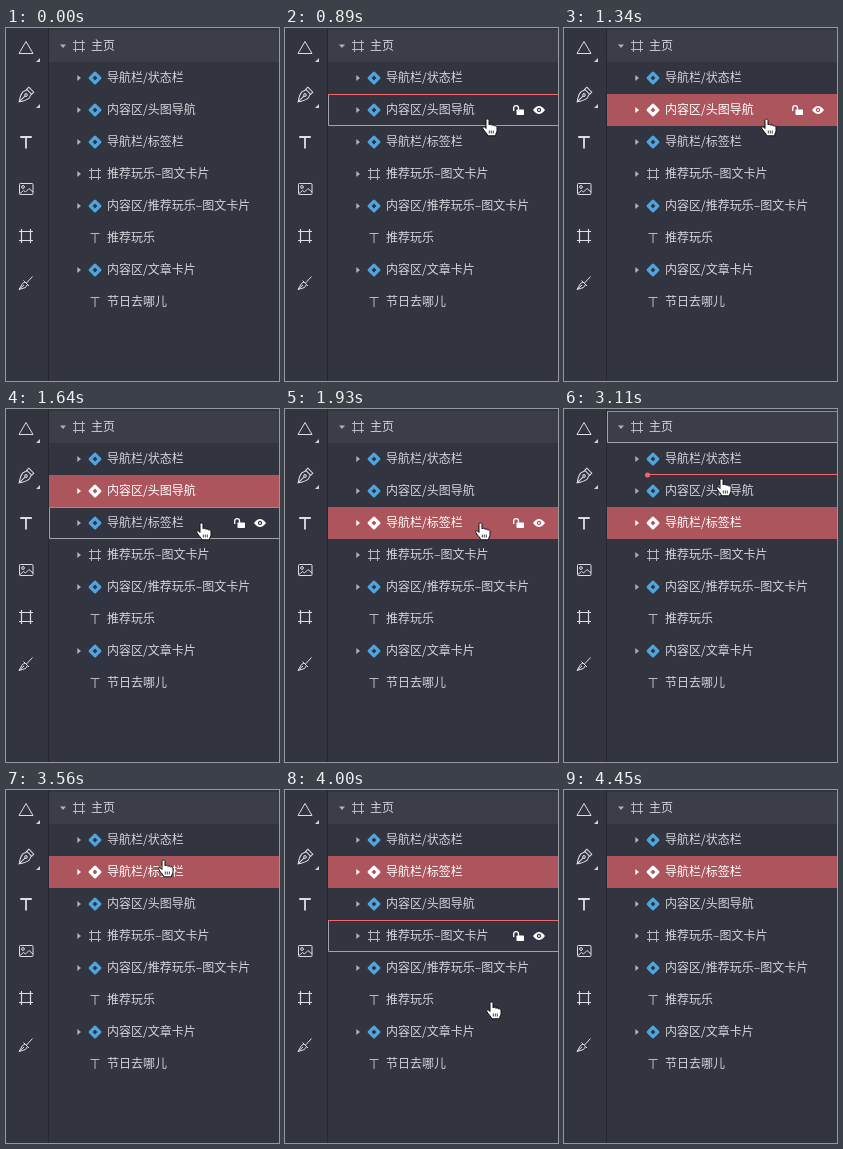
Animation of 273x353 px, one loop 5050 ms. Source, as an HTML page:

```html
<!DOCTYPE html>
<html lang="zh-CN">
<head>
<meta charset="utf-8">
<style>
  html, body { margin: 0; width: 100%; height: 100%; overflow: hidden; background: #323440; }
  svg { display: block; }
  text { font: 12px "Noto Sans CJK SC", "Noto Sans CJK", "Noto Sans", sans-serif; fill: currentColor; }
  .line { fill: none; stroke: currentColor; }
</style>
</head>
<body>
<svg width="273" height="353" viewBox="0 0 273 353">
  <defs>
    <!-- Icons are centred on 0,0 -->
    <path id="frame" class="line" d="M-3.5-6V6M3.5-6V6M-6-3.5H6M-6 3.5H6"/>
    <path id="letter" class="line" d="M-4.5-4.5H4.5M0-4.5V5"/>
    <path id="component" fill-rule="evenodd" d="M-1-6Q0-7 1-6L6-1Q7 0 6 1L1 6Q0 7-1 6L-6 1Q-7 0-6-1ZM0-2.4L-2.4 0 0 2.4 2.4 0Z"/>
    <path id="caret" d="M-1.7-3L2 0-1.7 3Z"/>
    <path id="corner" d="M34 30V34H30Z"/>
    <g id="actions">
      <path class="line" stroke-width="1.3" d="M228.7 1V-2a2.4 2.4 0 0 1 4.8 0V0"/>
      <rect x="231.5" y="-.5" width="7.5" height="5.5" rx=".7" fill="currentColor"/>
      <path fill="currentColor" fill-rule="evenodd" d="M248 0Q254-8 260 0Q254 8 248 0ZM254-2.2a2.2 2.2 0 1 0 .01 0Z"/>
      <circle cx="254" r="1" fill="currentColor"/>
    </g>
    <g id="hand" stroke="#111" stroke-linejoin="round">
      <path fill="#fff" d="M5 10.5V2.5c0-2 3-2 3 0V6.8c1-.9 2.5-.6 2.8.5 1-.8 2.3-.4 2.6.7 1-.6 2.6 0 2.6 1.5v3c0 2-1.4 2.6-1.4 5.3H6.7c0-2-2.8-3.5-4.8-7.2-.8-1.6 1-2.5 2-1.4z"/>
      <path stroke-width=".8" d="M8.3 12.5V15.5M10.3 12.5V15.5M12.3 12.5V15.5"/>
    </g>
  </defs>

  <rect width="273" height="353" fill="#323440"/>
  <rect x="43" y="2" width="230" height="32" fill="#3b3d49"/>
  <path d="M42.5 0V353" stroke="#252630"/>
  <g color="#dddee2" fill="#d0d1d6">
    <path class="line" d="M20 13.5L27 25.5H13Z"/>
    <use href="#corner"/>
    <use href="#corner" y="46"/>
    <g class="line" transform="translate(20 67) rotate(45)">
      <path d="M0 9.5Q-4 4.5-4.5 0L-3-4.5H3L4.5 0Q4 4.5 0 9.5V1.5M-3.5-7.5H3.5V-4.5H-3.5Z"/>
      <circle r="1.3"/>
    </g>
    <path class="line" stroke-width="1.8" d="M14.2 109H25.8M20 109V120.5"/>
    <g class="line">
      <rect x="13.5" y="155.5" width="13.5" height="11" rx=".8"/>
      <circle cx="17" cy="159" r="1.4"/>
      <path d="M14 165.5L17.5 162.5 19.5 164 23 160.5 27 164"/>
    </g>
    <path class="line" stroke-width="1.2" d="M15.5 201V215M24.5 201V215M13 203.5H27M13 212.5H27"/>
    <path class="line" d="M13 261.5L16.5 255.5 19 254 21.5 256.5 19.5 259.5ZM13 261.5L18 257M17.5 252.5L23 258M20.5 255L26.5 248.5"/>
  </g>
  <g id="scene"></g>
</svg>

<script>
const LOOP = 5050, ROW = 32;
const RED = '#ac555c', ACCENT = '#f0686d', TEXT = '#d3d4d9', BLUE = '#4fa6de';
const layers = [
  ['component', '导航栏/状态栏'],
  ['component', '内容区/头图导航'],
  ['component', '导航栏/标签栏'],
  ['frame', '推荐玩乐–图文卡片'],
  ['component', '内容区/推荐玩乐–图文卡片'],
  ['letter', '推荐玩乐'],
  ['component', '内容区/文章卡片'],
  ['letter', '节日去哪儿'],
];

// Each step changes only the listed properties. Rows count from 0 (the page).
const initial = { hand: null, outline: null, actions: null, selected: null, drop: null, swapped: false };
const changes = [
  [0, {}],
  [450, { hand: [222, 109], outline: 3, actions: 3 }],
  [600, { hand: [198, 95] }],
  [740, { hand: [196, 92], outline: 2, actions: 2 }],
  [890, { hand: [196, 90] }],
  [1340, { selected: 2, outline: null }],
  [1490, { hand: [192, 105], outline: 3, actions: 3 }],
  [1640, { hand: [189, 113] }],
  [1930, { selected: 3, outline: null }],
  [2230, { hand: [149, 113] }],
  [2380, { hand: [144, 113] }],
  [2670, { hand: [143, 111] }],
  [2820, { hand: [146, 89], outline: 0, drop: 3 }],
  [2970, { hand: [149, 76], actions: null }],
  [3110, { hand: [151, 69], drop: 2 }],
  [3560, { outline: null, drop: null, selected: 2, swapped: true }],
  [3710, { hand: [149, 72], actions: 2 }],
  [3850, { hand: [151, 85] }],
  [4000, { hand: [200, 211], outline: 4, actions: 4 }],
  [4150, { hand: [243, 303], outline: null, actions: null }],
  [4300, { hand: [245, 338] }],
  [4450, { hand: null }],
];
let current = initial;
const steps = changes.map(([time, change]) => {
  current = { ...current, ...change };
  return { time, ...current };
});

const rowTop = row => 2 + ROW * row;
const icon = (id, x, y, color) => `<use href="#${id}" x="${x}" y="${y}" fill="${color}" color="${color}"/>`;

function drawLayer([kind, name], row, selected) {
  const y = rowTop(row) + 16, color = selected ? '#fff' : TEXT;
  const iconColor = selected ? '#fff' : kind === 'component' ? BLUE : '#b9bac1';
  return (selected ? `<rect x="43" y="${rowTop(row)}" width="230" height="${ROW}" fill="${RED}"/>` : '') +
    (kind === 'letter' ? '' : icon('caret', 73, y, selected ? '#fff' : '#b0b1b9')) +
    icon(kind, 89, y, iconColor) +
    `<text x="101" y="${y + 4.4}" color="${color}">${name}</text>`;
}

function drawOutline(row) {
  const y = rowTop(row) + .5;
  return `<path class="line" color="#a3a4aa" d="M273 ${y + 31}H43.5V${y}"/>
    <path class="line" color="${ACCENT}" d="M43 ${y}H273"/>`;
}

function drawDrop(row) {
  const y = rowTop(row);
  return `<circle cx="83.5" cy="${y}" r="2.5" fill="${ACCENT}"/>
    <rect x="83" y="${y - 1}" width="190" height="1" fill="${ACCENT}"/>`;
}

function draw({ hand, outline, actions, selected, drop, swapped }) {
  const list = [...layers];
  if (swapped) [list[1], list[2]] = [list[2], list[1]];
  return `<path d="M54 16.5H60L57 20Z" fill="#b0b1b9"/>` + icon('frame', 73, 18, '#b9bac1') +
    `<text x="85" y="22.4" color="${TEXT}">主页</text>` +
    list.map((layer, i) => drawLayer(layer, i + 1, selected === i + 1)).join('') +
    (outline === null ? '' : drawOutline(outline)) +
    (actions === null ? '' : icon('actions', 0, rowTop(actions) + 16, '#fff')) +
    (drop === null ? '' : drawDrop(drop)) +
    (hand ? `<use href="#hand" x="${hand[0]}" y="${hand[1]}"/>` : '');
}

const sceneGroup = document.getElementById('scene');
const began = performance.now();
let shown;
function tick() {
  const time = (performance.now() - began) % LOOP;
  const step = steps.findLast(s => s.time <= time);
  if (step !== shown) sceneGroup.innerHTML = draw(shown = step);
  requestAnimationFrame(tick);
}
tick();
</script>
</body>
</html>
```
